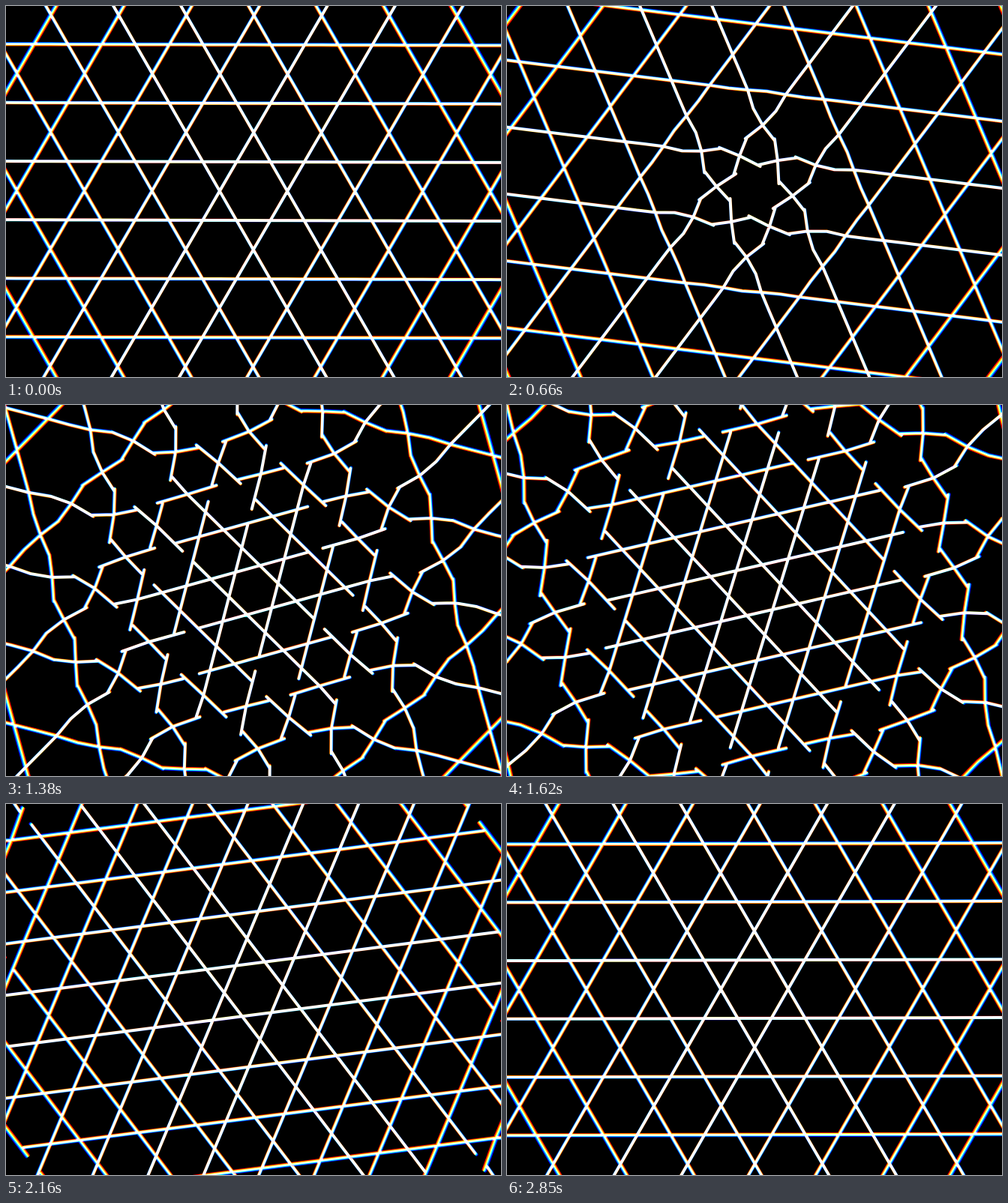
Animation of 660 by 495 pixels, one loop 2880 ms. Source, as an HTML page with a canvas:

```html
<!DOCTYPE html>
<html>
<head>
<meta charset="utf-8">
<style>
html, body { margin: 0; width: 100%; height: 100%; overflow: hidden; background: #000; }
canvas { display: block; }
</style>
</head>
<body>
<canvas id="stage" width="660" height="495"></canvas>
<script>
const ctx = document.getElementById('stage').getContext('2d');
const LOOP = 2880, STEP = 30, EDGE = 45, WIDTH = 4, FRINGE = 0.004;
const ROOT3 = Math.sqrt(3), RAD = Math.PI / 180;
const clamp = x => Math.max(0, Math.min(1, x));

// Kagome vertices, each crossed by two lines: one swings clockwise and
// grows long, the other swings back and stays short.
const bars = [];
function addBar(x, y, angle, turn, reach) {
  const ends = [angle, angle + 180].map(a => {
    const r = Math.hypot(x + Math.cos(a * RAD) / 2, y + Math.sin(a * RAD) / 2);
    return { a, delay: 0.08 * r + 0.0015 * r * r };
  });
  bars.push({ x, y, turn, reach, ends });
}
for (let n = -12; n <= 12; n++) {
  for (let m = -18; m <= 18; m++) {
    const x = m + n / 2, y = n * ROOT3 / 2;
    if (!(m & 1) && !(n & 1) || Math.hypot(x, y) > 11) continue;
    const long = !(n & 1) ? 120 : m & 1 ? 60 : 0;
    addBar(x, y, long, 30, 2 / ROOT3);
    addBar(x, y, long + 120, -30, 1 / ROOT3);
  }
}

function tip(bar, end, t) {
  const age = t - end.delay;
  const u = clamp((age + 0.05) / 0.35);
  const v = clamp((age - 0.05) / 0.285);
  const swing = u * u * (3 - 2 * u);
  const grow = 0.4 * v + 0.6 * v ** 12;
  const a = (end.a + bar.turn * swing) * RAD;
  const len = 0.5 + (bar.reach - 0.5) * grow;
  return [bar.x + len * Math.cos(a), bar.y + len * Math.sin(a)];
}

function lattice(t) {
  const path = new Path2D();
  for (const bar of bars) {
    path.moveTo(...tip(bar, bar.ends[0], t));
    path.lineTo(bar.x, bar.y);
    path.lineTo(...tip(bar, bar.ends[1], t));
  }
  return path;
}

function drawChannel(path, t, zoom, color) {
  const size = EDGE * ROOT3 ** t * zoom;
  ctx.save();
  ctx.translate(330, 247);
  ctx.rotate(30 * RAD * t);
  ctx.scale(size, size);
  ctx.lineWidth = WIDTH / size;
  ctx.strokeStyle = color;
  ctx.stroke(path);
  ctx.restore();
}

function frame() {
  const step = Math.floor(performance.now() % LOOP / STEP);
  const t = (step + 0.5) * STEP / LOOP;
  const path = lattice(t);
  ctx.globalCompositeOperation = 'source-over';
  ctx.fillStyle = '#000';
  ctx.fillRect(0, 0, 660, 495);
  // Each colour channel has its own zoom, which gives the radial fringes.
  ctx.globalCompositeOperation = 'lighter';
  ctx.lineCap = ctx.lineJoin = 'round';
  drawChannel(path, t, 1 - FRINGE, '#f00');
  drawChannel(path, t, 1, '#0f0');
  drawChannel(path, t, 1 + FRINGE, '#00f');
  requestAnimationFrame(frame);
}
frame();
</script>
</body>
</html>
```
